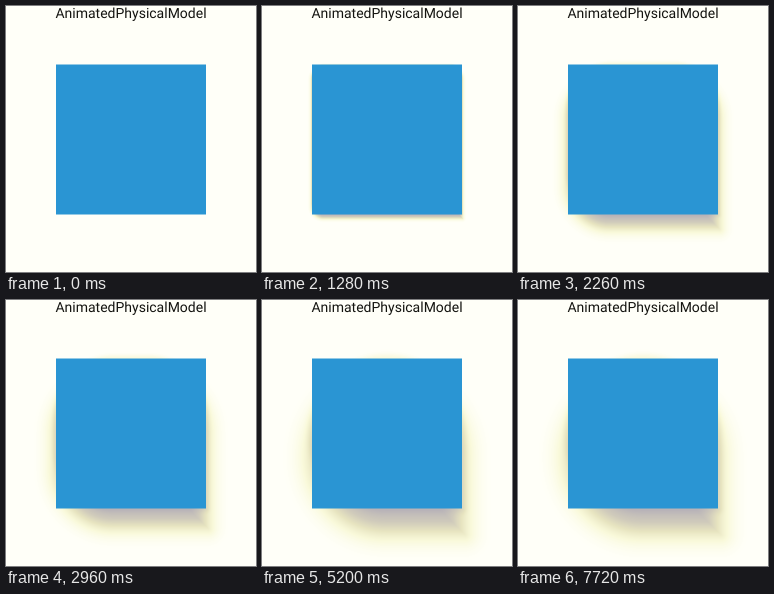
An HTML page with a canvas that plays this animation: 250x266 px, repeating every 8000 ms.

```html
<!DOCTYPE html>
<html lang="en">
<head>
<meta charset="utf-8">
<title>AnimatedPhysicalModel</title>
<style>
  html, body { margin: 0; width: 100%; height: 100%; overflow: hidden; background: #fffff8; }
  canvas { position: absolute; left: 0; top: 0; width: 250px; height: 266px; }
  h1 {
    position: absolute; left: 0; top: 0; width: 250px; margin: 0;
    font: 400 14px/16px Roboto, sans-serif; text-align: center; color: #141410;
    text-rendering: geometricPrecision;
  }
</style>
</head>
<body>
<canvas id="stage" width="250" height="266"></canvas>
<h1>AnimatedPhysicalModel</h1>
<script>
const W = 250, H = 266, LOOP = 8000, RISE = 6000;
const MAX_Z = 20, MAX_CORNER = 75;
const box = { x: 125, y: 133.5, half: 75 };
const light = { y: -541.5, z: 600, radius: 800 };
const ctx = document.getElementById('stage').getContext('2d');
const image = ctx.createImageData(W, H);

// Shadow strength -> colour
const tones = [
  [0, 255, 255, 248],
  [0.05, 249, 249, 218],
  [0.11, 231, 228, 192],
  [0.18, 208, 203, 187],
  [0.28, 184, 179, 184]
];

function tone(a) {
  let i = 1;
  while (i < tones.length - 1 && a > tones[i][0]) i++;
  const lo = tones[i - 1], hi = tones[i];
  const k = Math.min(1, (a - lo[0]) / (hi[0] - lo[0]));
  return [1, 2, 3].map(c => lo[c] + (hi[c] - lo[c]) * k);
}
const ramp = Array.from({ length: 257 }, (_, i) => tone(i / 256 * 0.3));

// cubic-bezier(0.4, 0, 0.2, 1)
function ease(t) {
  if (t <= 0 || t >= 1) return t <= 0 ? 0 : 1;
  let lo = 0, hi = 1;
  for (let i = 0; i < 24; i++) {
    const u = (lo + hi) / 2, v = 1 - u;
    if (1.2 * u * v * v + 0.6 * u * u * v + u * u * u < t) lo = u; else hi = u;
  }
  return lo * lo * (3 - 2 * lo);
}

// Signed distance to a square rounded on all corners but the bottom right
function distance(x, y, half, corner) {
  const r = x > 0 && y > 0 ? 0 : corner;
  const qx = Math.abs(x) - half + r, qy = Math.abs(y) - half + r;
  const ox = Math.max(qx, 0), oy = Math.max(qy, 0);
  return Math.min(Math.max(qx, qy), 0) + Math.sqrt(ox * ox + oy * oy) - r;
}

// Penumbra: 1 at the inner rim (t = 0), 0 at the outer rim (t = 1)
function falloff(t) {
  if (t >= 1) return 0;
  return t <= 0 ? 1 : (Math.exp(-4 * t * t) - 0.0183) / 0.9817;
}

function drawShadow(z, corner) {
  const ratio = z / (light.z - z), scale = 1 + ratio;
  const blur = light.radius * ratio, reach = z / 2;
  const drop = (box.y - light.y) * ratio;
  const px = image.data;
  for (let y = 0, p = 0; y < H; y++) {
    const dy = y + 0.5 - box.y;
    for (let x = 0; x < W; x++, p += 4) {
      const dx = x + 0.5 - box.x;
      const spot = distance(dx, dy - drop, box.half * scale, corner * scale);
      const ambient = distance(dx, dy, box.half, corner);
      const a = 0.25 * falloff((spot + blur) / (2 * blur)) + 0.039 * falloff(ambient / reach);
      const c = ramp[Math.round(a / 0.3 * 256)];
      px[p] = c[0];
      px[p + 1] = c[1];
      px[p + 2] = c[2];
      px[p + 3] = 255;
    }
  }
  ctx.putImageData(image, 0, 0);
}

function draw(k) {
  ctx.fillStyle = '#fffff8';
  ctx.fillRect(0, 0, W, H);
  if (k > 0.001) drawShadow(MAX_Z * k, MAX_CORNER * k);
  ctx.fillStyle = '#2a95d3';
  ctx.fillRect(box.x - box.half, box.y - box.half, 2 * box.half, 2 * box.half);
}

const start = performance.now();
function frame() {
  const t = (performance.now() - start) % LOOP;
  draw(ease(t / RISE));
  requestAnimationFrame(frame);
}
frame();
</script>
</body>
</html>
```
